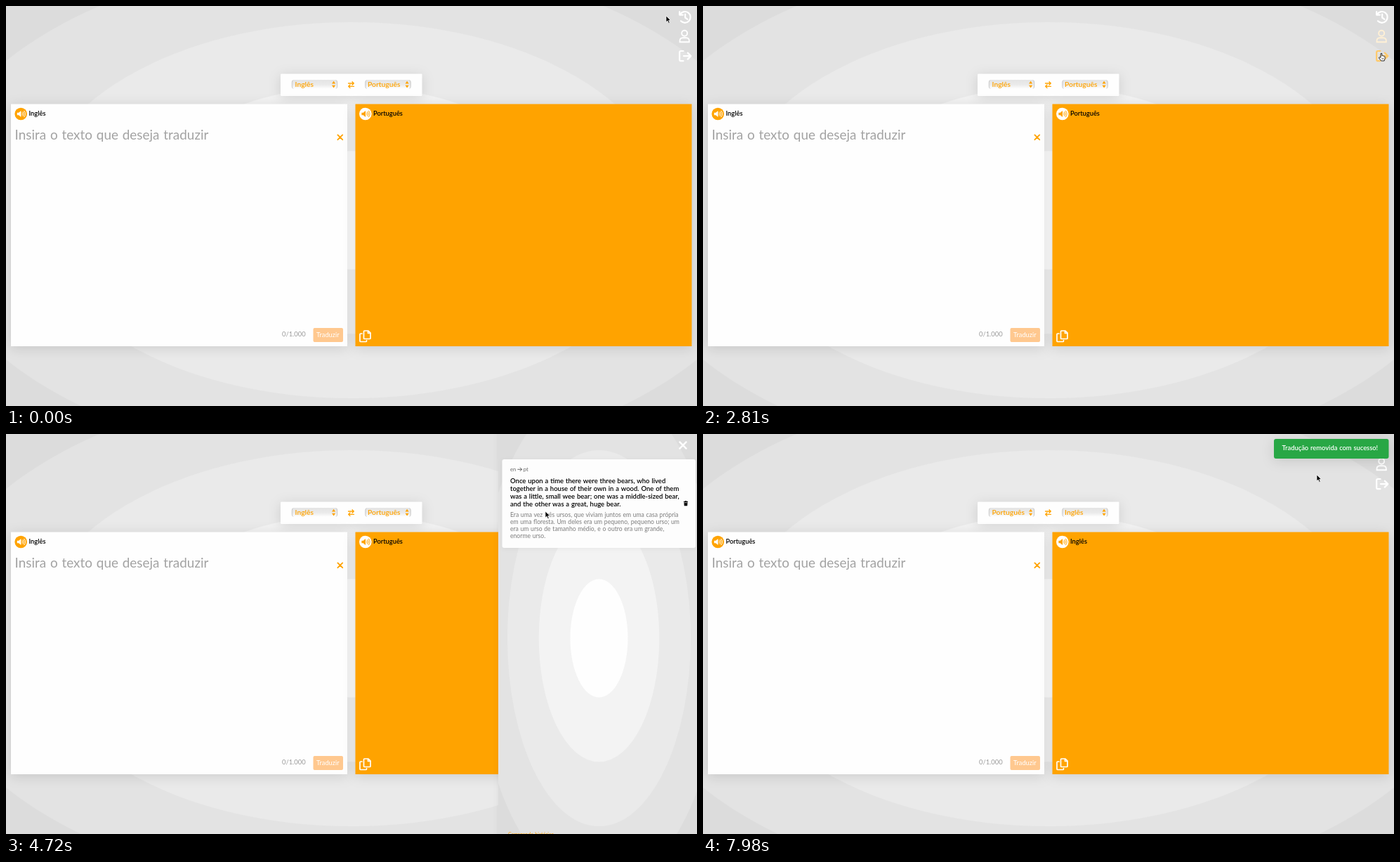
Write an HTML page that moves like this. It is 984 px wide and 569 px high and loops after 8 s.

```html
<!DOCTYPE html>
<html lang="pt">
<head>
<meta charset="utf-8">
<title>Tradutor</title>
<style>
  html, body { margin: 0; width: 100%; height: 100%; overflow: hidden; background: #e2e2e2; }
  svg { display: block; }
  text { font-family: Lato, "Open Sans", sans-serif; word-spacing: .05em; white-space: pre; }
  .bold { font-weight: 600; }
  .orange { fill: #ffa300; }
  .box { filter: drop-shadow(0 3px 9px rgba(0, 0, 0, .12)); }
  .card { filter: drop-shadow(0 1px 3px rgba(0, 0, 0, .05)); }
  .line { fill: none; stroke-linecap: round; stroke-linejoin: round; }
</style>
</head>
<body>
<svg width="984" height="569" viewBox="0 0 984 569">
  <defs>
    <linearGradient id="field" x2="0" y2="1">
      <stop offset=".1" stop-color="#e5e5e5"/>
      <stop offset=".55" stop-color="#ebebeb"/>
      <stop offset="1" stop-color="#fff"/>
    </linearGradient>
    <clipPath id="sideClip"><rect x="701" width="283" height="569"/></clipPath>
    <g id="speaker">
      <path d="M-5.2-1.7h2.4L.4-4.5v9L-2.8 1.7h-2.4z" fill="currentColor"/>
      <path class="line" d="M2-1.6q1.4 1.6 0 3.2M3.4-3q2.7 3 0 6M4.9-4.3q3.6 4.3 0 8.6" stroke="currentColor"/>
    </g>
    <g id="select">
      <rect width="65" height="13" rx="3" fill="url(#field)"/>
      <path class="line" d="M1.5.8Q.3 1.5.3 4v5q0 2.5 1.2 3.3M63.5.8q1.2.7 1.2 3.2v5q0 2.5-1.2 3.3" stroke="#c9c9c9"/>
      <path class="orange" d="M57 5.4l2.6-3.6 2.6 3.6zM57 7.8l2.6 3.6 2.6-3.6z"/>
    </g>
    <path id="cross" class="line" d="M-1-1L1 1M1-1L-1 1" vector-effect="non-scaling-stroke"/>
  </defs>

  <g id="backdrop"></g>

  <rect class="box" x="391" y="96.5" width="201.5" height="31.5" rx="1" fill="#fefefe"/>
  <use href="#select" x="407" y="105"/>
  <use href="#select" x="511.5" y="105"/>
  <path class="line" d="M487.5 110h7.5m-2-2.3l2.3 2.3-2.3 2.3M495.5 114.3h-7.5m2-2.3l-2.3 2.3 2.3 2.3" stroke="#ffa300" stroke-width="1.3"/>

  <rect class="box" x="7" y="139.5" width="479" height="344.5" fill="#fefefe"/>
  <rect class="box orange" x="497.5" y="139.5" width="479" height="344.5"/>
  <circle cx="21.2" cy="153.5" r="8.8" class="orange"/>
  <use href="#speaker" x="21" y="153.5" color="#fff"/>
  <circle cx="511.8" cy="153.5" r="8.8" fill="#fff"/>
  <use href="#speaker" x="511.6" y="153.5" color="#ffa300"/>

  <g class="bold" id="languages">
    <text class="orange" x="411.5" y="115" font-size="10.3"></text>
    <text class="orange" x="515" y="115" font-size="10.3"></text>
    <text x="32.5" y="156.3" font-size="9.3"></text>
    <text x="523" y="156.3" font-size="9.3"></text>
  </g>
  <text x="12.5" y="190" font-size="18.95" fill="#a3a3a3">Insira o texto que deseja traduzir</text>
  <use href="#cross" transform="translate(475.8 186.8) scale(3.4)" stroke="#ffa300" stroke-width="1.9"/>
  <text x="393" y="470.3" font-size="9.4" fill="#999">0/1.000</text>
  <rect x="437.5" y="458" width="42.5" height="20" rx="2" fill="#ffc88f"/>
  <text x="442" y="470.5" font-size="9.3" fill="#fff">Traduzir</text>
  <g class="line" stroke="#fff" stroke-width="1.7">
    <path d="M510.5 462h5.5l3 3v7.5q0 1-1 1h-7.5q-1 0-1-1v-9.5q0-1 1-1zM515.5 462.3v3.2h3.2"/>
    <path d="M507 466h-2q-1 0-1 1v9.5q0 1 1 1h7.5q1 0 1-1v-1"/>
  </g>

  <g id="menu" class="line" stroke-width="2.2">
    <path id="history" d="M960.2 11.5a7.9 7.9 0 1 1 .8 9.8M959.2 8v4.7h4.7M967.2 11.5v5l3.2 2.3"/>
    <g id="user" stroke-width="1.9"><circle cx="966.2" cy="38.8" r="4"/><path d="M959.5 51.3q-.6-6 4.3-6h4.8q4.9 0 4.3 6z"/></g>
    <path id="logout" d="M964.5 64h-3.3q-2 0-2 2v10.2q0 2 2 2h3.3M965 71.1h10m-4.2-4.5l4.5 4.5-4.5 4.5"/>
  </g>

  <g id="side">
    <rect x="701" y="-10" width="300" height="590" fill="#e1e1e1" style="filter:drop-shadow(0 0 5px rgba(0,0,0,.06))"/>
    <g id="sideBackdrop" clip-path="url(#sideClip)"></g>
    <use id="close" href="#cross" transform="translate(964 16) scale(4.6)" stroke-width="2.3"/>
    <rect class="card" x="706.5" y="36" width="275.5" height="126" rx="3" fill="#fdfdfd"/>
    <g font-size="7.6" fill="#666"><text x="718" y="53">en</text><text x="736.8" y="53">pt</text></g>
    <path class="line" d="M728.8 50.3h5.7m-2.3-2.3l2.3 2.3-2.3 2.3" stroke="#555" stroke-width=".9"/>
    <g id="story" class="bold" font-size="9.5"></g>
    <g id="storyPt" font-size="8.65" fill="#7c7c7c"></g>
    <path d="M965 95.8h1.7l.5-.8h1.6l.5.8h1.7v1.2h-6zM965.4 97.5h5.2l-.4 4.7h-4.4z" fill="#111"/>
    <text class="orange" x="715" y="572" font-size="7.1">Carregando histórico</text>
  </g>

  <g id="toast">
    <rect class="box" x="813" y="7" width="163.5" height="28" rx="3" fill="#28a745"/>
    <text class="bold" x="824.5" y="23.3" font-size="9.35" fill="#fff">Tradução removida com sucesso!</text>
  </g>

  <path id="arrow" d="M0 0v9l2.1-1.9 1.5 3.3 1.6-.7-1.5-3.2h2.8z" stroke="#fff" stroke-width=".7"/>
  <g id="hand" fill="#fff" stroke="#111" stroke-width=".9" stroke-linejoin="round">
    <path d="M-.9 6.3V.8Q0-.7.9.8v3q1-.6 1.7.3 1-.4 1.5.5 1-.2 1 .9v2q0 1.5-.9 2.5v1h-4.5Q-1.5 9.5-3.5 6.8q0-1.3 1.3-.9z"/>
    <path d="M1 7v1.9M2.6 7v1.9" stroke-width=".6"/>
  </g>
</svg>
<script>
const LOOP = 8000, TICK = 147.6, AWAKE = 1850, OPEN = 3700, REMOVED = 6350, FADE = 300;
const $ = id => document.getElementById(id);

// Stops of the pointer: time, x, y. It eases from one to the next.
const stops = [
  [300, 940, 14], [1180, 965, 17], [1340, 965, 17], [1620, 930, 29], [1740, 930, 29],
  [2066, 966, 14], [2810, 966, 67], [3240, 968, 15], [3830, 968, 15], [4580, 768, 110],
  [5120, 974, 112], [5320, 967, 96], [6060, 967, 96], [6340, 968, 98], [6450, 968, 98],
  [7450, 799, 23], [7970, 874, 58]
];
const targets = { history: [966, 16], user: [966, 43], logout: [966, 71], close: [966, 16], trash: [968, 99] };

const clamp = v => Math.max(0, Math.min(1, v));
const ease = v => v * v * (3 - 2 * v);
const show = (el, on) => { el.style.display = on ? "" : "none"; };

function addBands(group, cx, radius) {
  for (let k = 0; k < 5; k++) {
    const size = 1.1 - k * .2237;
    const gray = Math.round(220 + 6 * k + .6 * k * k);
    group.innerHTML += `<ellipse cx="${cx}" cy="290.5" rx="${radius * size}" ry="${410 * size}" fill="rgb(${gray},${gray},${gray})"/>`;
  }
}

function addLines(group, y, pitch, lines) {
  group.innerHTML = lines.map((line, i) => `<text x="718" y="${y + i * pitch}">${line}</text>`).join("");
}

function pointer(time) {
  const next = stops.findIndex(stop => stop[0] > time);
  if (next === 0) return stops[0].slice(1);
  if (next < 0) return stops.at(-1).slice(1);
  const [t0, x0, y0] = stops[next - 1], [t1, x1, y1] = stops[next];
  const part = ease((time - t0) / (t1 - t0));
  return [x0 + (x1 - x0) * part, y0 + (y1 - y0) * part];
}

function isOver(id, time) {
  const [x, y] = pointer(time), [cx, cy] = targets[id];
  return time > AWAKE && Math.abs(x - cx) < 10 && Math.abs(y - cy) < 10;
}

// The tint follows how much of the last FADE ms the pointer spent on the icon.
function hoverColor(id, time) {
  const samples = 12;
  let hits = 0;
  for (let i = 0; i < samples; i++) hits += isOver(id, time - i * FADE / samples);
  const mix = clamp(hits / samples);
  return `rgb(255,${255 - 92 * mix},${255 * (1 - mix)})`;
}

function draw(time) {
  const now = Math.floor(time / TICK) * TICK;
  const removed = time >= REMOVED;
  const opened = time >= OPEN && !removed;

  show($("side"), opened);
  show($("menu"), !opened);
  show($("toast"), removed);
  for (const id of ["history", "user", "logout", "close"]) $(id).setAttribute("stroke", hoverColor(id, now));

  const pair = removed ? ["Português", "Inglês"] : ["Inglês", "Português"];
  [...$("languages").children].forEach((label, i) => { label.textContent = pair[i % 2]; });

  const isHand = Object.keys(targets).some(id => isOver(id, now));
  show($("hand"), isHand);
  show($("arrow"), !isHand);
  $(isHand ? "hand" : "arrow").setAttribute("transform", `translate(${pointer(now).join(" ")})`);
}

addBands($("backdrop"), 492, 696);
addBands($("sideBackdrop"), 844.5, 200);
addLines($("story"), 69.5, 11, [
  "Once upon a time there were three bears, who lived",
  "together in a house of their own in a wood. One of them",
  "was a little, small wee bear; one was a middle-sized bear,",
  "and the other was a great, huge bear."
]);
addLines($("storyPt"), 118.2, 9.9, [
  "Era uma vez três ursos, que viviam juntos em uma casa própria",
  "em uma floresta. Um deles era um pequeno, pequeno urso; um",
  "era um urso de tamanho médio, e o outro era um grande,",
  "enorme urso."
]);

const start = performance.now();
function tick() {
  draw((performance.now() - start) % LOOP);
  requestAnimationFrame(tick);
}
tick();
</script>
</body>
</html>
```
